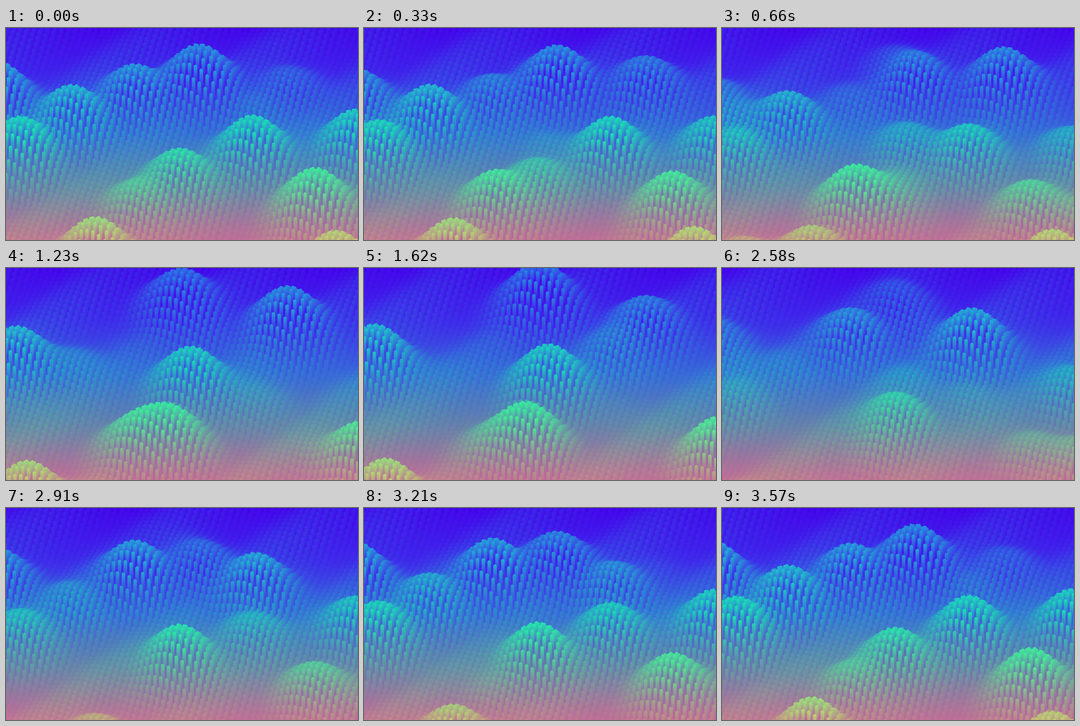
Animation, 493 px wide and 297 px high, one loop 3600 ms. Source, as an HTML page with a canvas:

```html
<!DOCTYPE html>
<html lang="en">
<head>
<meta charset="utf-8">
<title>Waving bars</title>
<style>
html, body { margin: 0; width: 100%; height: 100%; overflow: hidden; background: #4400ea; }
canvas { display: block; }
</style>
</head>
<body>
<canvas id="stage" width="493" height="297"></canvas>
<script>
const W = 493, H = 297, LOOP = 3600, TAU = 2 * Math.PI;
const LIFT = 80, SX = 44, SY = 28, BAR = 22;
const ctx = document.getElementById('stage').getContext('2d');

// Evenly spaced colour stops from the top of the stage to the bottom
const BACK = ['#4400ea', '#4020ec', '#3860dc', '#667aac', '#c06898'];
const GLOW = ['#2880e6', '#20bcd0', '#18e8b0', '#50f090', '#c4d66c'];

// Key hills: x, y, moment of the peak within the loop
const HILLS = [
  [-15, 128, .95], [15, 162, .42], [20, 208, 0], [92, 162, .05],
  [180, 126, .88], [270, 106, .03], [245, 75, .47], [394, 106, .27],
  [350, 140, .7], [345, 206, .03], [258, 190, .42], [490, 196, .95],
  [243, 244, .88], [185, 276, .2], [228, 272, .43], [432, 280, 0],
  [496, 292, .45], [125, 348, .03], [30, 350, .42], [462, 362, .1]
];

const parse = hex => [1, 3, 5].map(i => parseInt(hex.slice(i, i + 2), 16));
const mix = (a, b, k) => a.map((v, i) => v + (b[i] - v) * k);
const rgb = c => `rgb(${c.map(Math.round).join()})`;

function ramp(stops) {
  const cols = stops.map(parse), last = cols.length - 1;
  const list = Array.from({ length: H + 1 }, (_, y) => {
    const p = y / H * last, i = Math.min(last - 1, Math.floor(p));
    return mix(cols[i], cols[i + 1], p - i);
  });
  return y => list[Math.max(0, Math.min(H, Math.round(y)))];
}

const back = ramp(BACK), glow = ramp(GLOW);

// Slightly turned grid, sorted from far to near
const bars = [];
for (let i = -20; i < 90; i++) {
  for (let j = -40; j < 80; j++) {
    const x = i * 8.2 - j * 2.7, y = i * 2.5 + j * 7.2;
    if (x < -6 || x > W + 6 || y < 0 || y > 400) continue;
    const near = [];
    HILLS.forEach(([hx, hy], n) => {
      const g = Math.exp(-(((x - hx) / SX) ** 2 + ((y - hy) / SY) ** 2) / 2);
      if (g > .01) near.push([n, g]);
    });
    bars.push({ x, y, near });
  }
}
bars.sort((a, b) => a.y - b.y);

const sky = ctx.createLinearGradient(0, 0, 0, H);
BACK.forEach((c, i) => sky.addColorStop(i / (BACK.length - 1), c));

function height({ x, y, near }, level, t) {
  const ripple = .16 + .1 * Math.sin(x / 31 + y / 23 + TAU * t);
  let sum = ripple ** 3;
  for (const [n, g] of near) sum += (level[n] * g) ** 3;
  return Math.cbrt(sum);
}

function draw(t) {
  const level = HILLS.map(hill => .55 + .42 * Math.cos(TAU * (t - hill[2])));
  ctx.fillStyle = sky;
  ctx.fillRect(0, 0, W, H);
  ctx.lineWidth = 5;
  ctx.lineCap = 'round';
  for (const bar of bars) {
    const h = height(bar, level, t), top = bar.y - LIFT * h, end = top + BAR;
    if (top > H + 4 || end < -4) continue;
    const fade = ctx.createLinearGradient(0, top - 2, 0, end);
    fade.addColorStop(0, rgb(mix(back(top), glow(top), Math.min(1, h * 1.15))));
    fade.addColorStop(1, rgb(back(end)));
    ctx.strokeStyle = fade;
    ctx.beginPath();
    ctx.moveTo(bar.x, top);
    ctx.lineTo(bar.x, end);
    ctx.stroke();
  }
}

function tick() {
  draw(performance.now() % LOOP / LOOP);
  requestAnimationFrame(tick);
}
tick();
</script>
</body>
</html>
```
